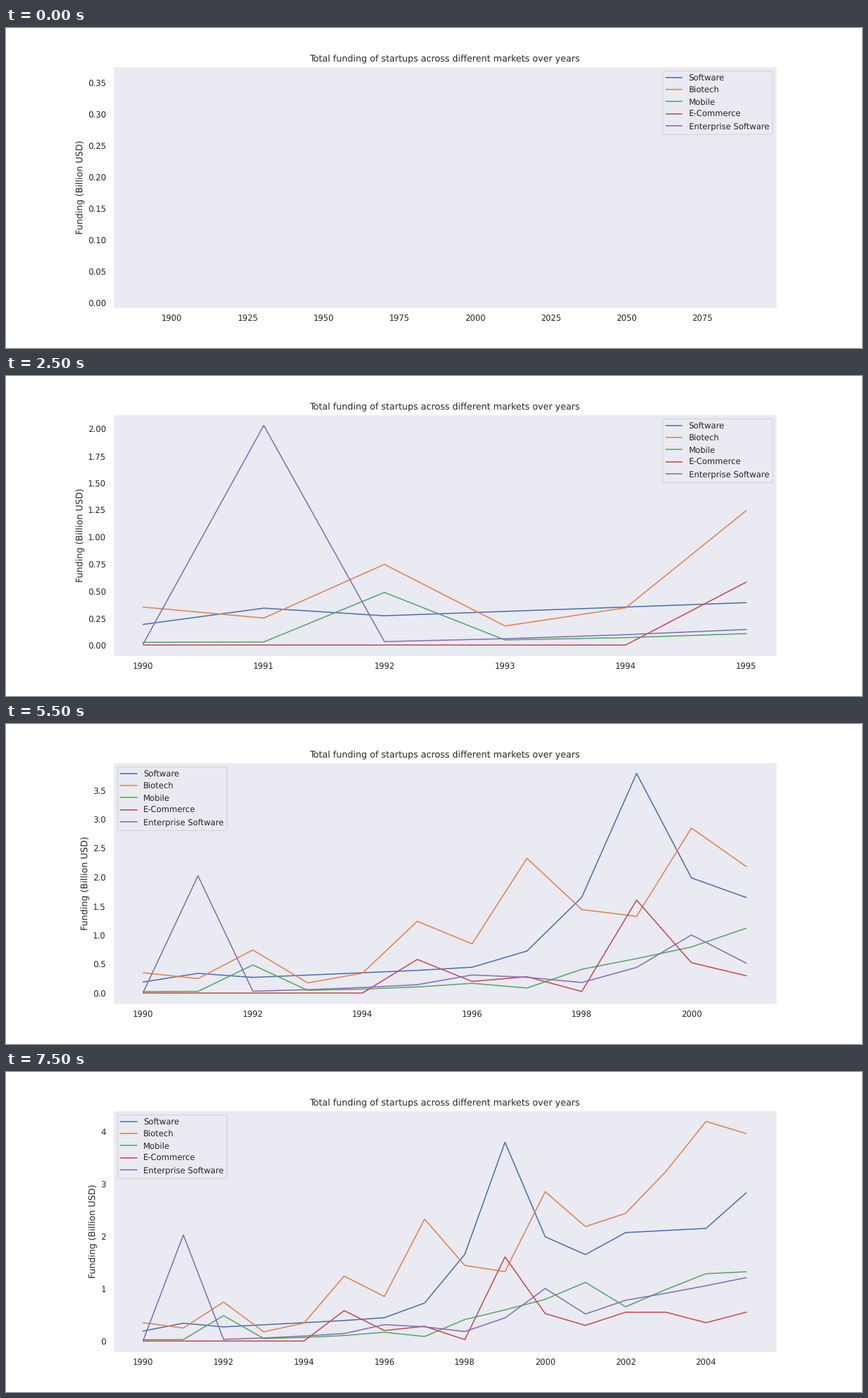
These frames come from a looping animation (1222x458 px, 8000 ms). A matplotlib script:

```python
import numpy as np
import matplotlib.pyplot as plt
from matplotlib.animation import FuncAnimation

W, H = 1222, 458
DPI = W / 16
INK = "#262626"

plt.rcParams.update({
    "font.family": "DejaVu Sans",
    "text.color": INK,
    "text.hinting": "none",
    "axes.labelcolor": INK,
    "axes.facecolor": "#EAEAF2",
    "axes.edgecolor": "white",
    "axes.linewidth": 1.25,
    "axes.labelsize": 12,
    "axes.titlesize": 12,
    "legend.fontsize": 11,
    "lines.linewidth": 1.5,
    "lines.solid_capstyle": "round",
    "patch.linewidth": 1,
})
for axis, side in (("xtick", "bottom"), ("ytick", "left")):
    plt.rcParams.update({
        f"{axis}.{side}": False,
        f"{axis}.color": INK,
        f"{axis}.labelsize": 11,
        f"{axis}.major.size": 6,
    })

START, STEPS = 1990, 16
t = np.arange(STEPS)
years = START + t


def surge(size, rate, mid):
    """S-shaped rise centred on a year."""
    return size / (1 + np.exp(-rate * (years - mid)))


def growth(size):
    """Quadratic rise over the whole period."""
    return size * (t / t[-1]) ** 2


def shocks(by_year):
    """Single years that stand off the trend."""
    return sum(np.where(years == y, size, 0) for y, size in by_year.items())


# Boom-and-bust cycle of eight thirds of a year, fading out by 2003
cycle = 0.7 * np.sin(np.pi * t / 13) * np.cos(0.75 * np.pi * (t - 2))

markets = {
    "Software": ("#4C72B0", 0.2 + 0.04 * t + surge(1.4, 3, 1997.5) + shocks(
        {1991: .11, 1999: 1.86, 2001: -.38, 2005: .64})),
    "Biotech": ("#DD8452", 0.36 + growth(3.84) + cycle + shocks(
        {1994: -.28, 1996: .58, 1997: .65, 2000: .33, 2002: -.37, 2004: .33})),
    "Mobile": ("#55A868", 0.03 + surge(1.35, .6, 1999.5) + shocks(
        {1992: .45, 1997: -.18, 2001: .14, 2002: -.47, 2003: -.24})),
    "E-Commerce": ("#C44E52", 0.01 + surge(.55, 3, 1999) + shocks(
        {1995: .58, 1996: .2, 1997: .28, 1999: 1.33, 2001: -.25, 2004: -.2})),
    "Enterprise Software": ("#8172B3", 0.02 + growth(1.2) + shocks(
        {1991: 2.01, 1996: .11, 1998: -.17, 2000: .46, 2001: -.14})),
}

# The tiny extra height keeps rounding from losing a pixel row
fig = plt.figure(figsize=(W / DPI, (H + 1e-6) / DPI), dpi=DPI, facecolor="white")
ax = fig.add_axes([0.125, 0.125, 0.775, 0.755])


def draw(step):
    """Redraw the chart with one more year per step; axes and legend refit."""
    ax.clear()
    shown = slice(step + 1)
    for name, (color, funding) in markets.items():
        ax.plot(years[shown], funding[shown], color=color, label=name)
    ax.set_title("Total funding of startups across different markets over years")
    ax.set_ylabel("Funding (Billion USD)")
    ax.legend(loc="best")
    return ax.lines


anim = FuncAnimation(fig, draw, frames=STEPS, interval=500,
                     repeat=True, repeat_delay=0, blit=False)
plt.show()
```
